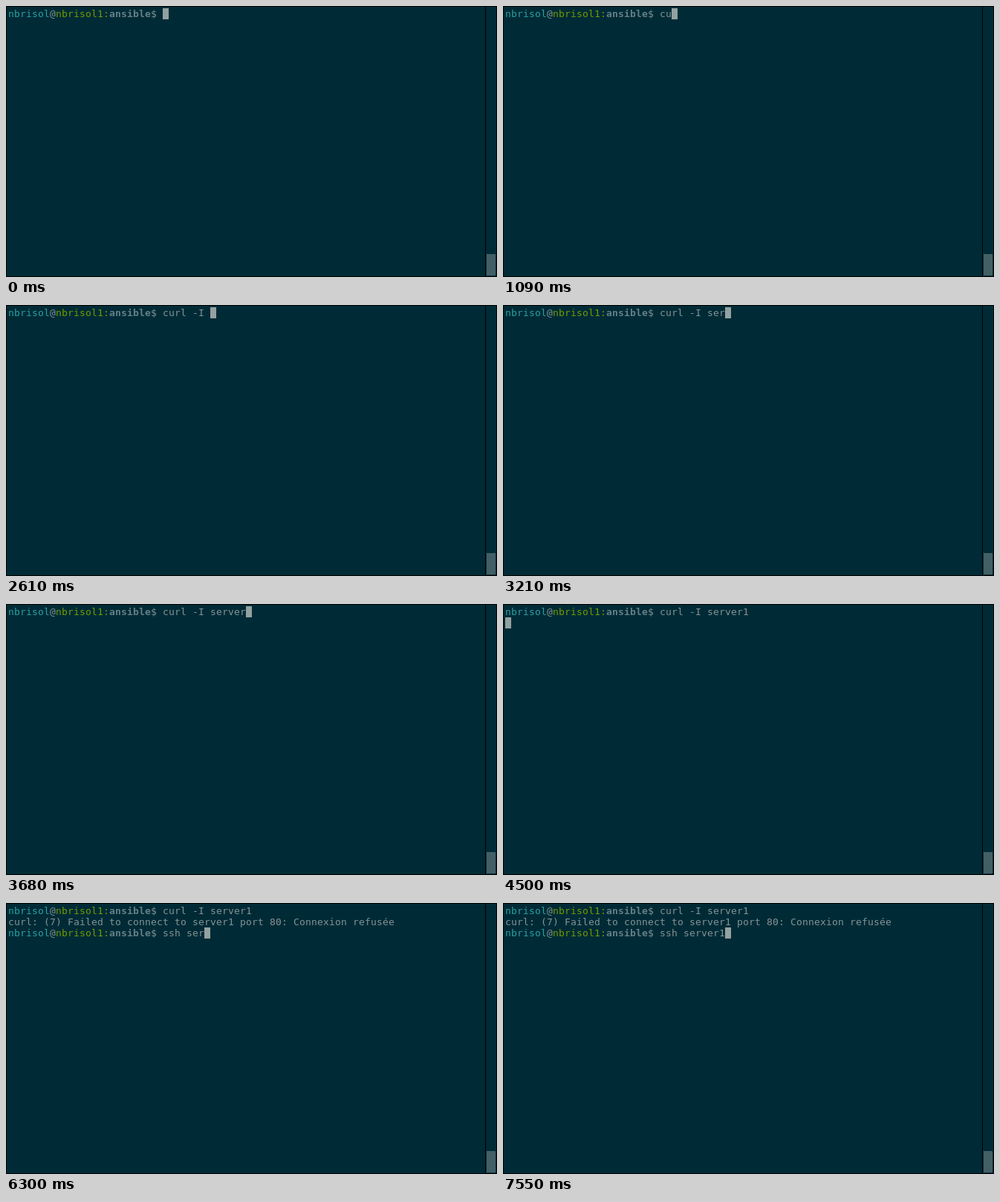
Recreate the animation shown at these times as an HTML page. Size 661 px wide and 366 px high, loop 8000 ms.

```html
<!DOCTYPE html>
<html lang="fr">
<head>
<meta charset="utf-8">
<title>Terminal</title>
<style>
  html, body { margin: 0; width: 100%; height: 100%; overflow: hidden; background: #002b36; }
  svg { display: block; }
  text { font: 13px "DejaVu Sans Mono", monospace; white-space: pre; }
</style>
</head>
<body>
<svg id="stage" width="661" height="366" viewBox="0 0 661 366">
  <defs>
    <pattern id="stipple" width="2" height="2" patternUnits="userSpaceOnUse">
      <path d="M0 0h1v1h1v1h-1v-1h-1z" fill="#839496" shape-rendering="crispEdges"/>
    </pattern>
  </defs>
  <rect width="661" height="366" fill="#002b36"/>
  <path d="M.5 .5h660v365H.5zM645.5 0v366" fill="none" stroke="#000"/>
  <rect x="647" y="335" width="12" height="29" fill="url(#stipple)"/>
  <g id="screen"></g>
  <rect id="cursor" width="8" height="15" fill="#93a1a1"/>
</svg>
<script>
const LOOP = 8000, CELL_W = 8, CELL_H = 15, MARGIN = 3;
const FG = "#839496", CYAN = "#2aa1a4", GREEN = "#729c00", DIM = "#657f88";
const USER = "nbrisol", HOST = "nbrisol1";
const PROMPT_LENGTH = `${USER}@${HOST}:ansible$ `.length;

const screen = document.getElementById("screen");
const cursor = document.getElementById("cursor");

// Each step: time in ms, then the characters that appear.
const curlKeys = [
  [1000, "c"], [1090, "u"], [1230, "r"], [1490, "l"], [1570, " "],
  [2230, "-"], [2510, "I"], [2610, " "], [2930, "s"], [3140, "e"],
  [3210, "r"], [3400, "v"], [3620, "e"], [3680, "r"], [3970, "1"]
];
const sshKeys = [
  [5600, "s"], [5750, "s"], [5850, "h"], [5950, " "], [6100, "s"],
  [6240, "e"], [6300, "r"], [6940, "ver"], [7550, "1"]
];
const ENTER = 4500, REPLY = 4600;

const cellX = col => MARGIN + col * CELL_W;
const cellY = row => MARGIN + row * CELL_H;
const typed = (keys, t) => keys.filter(([at]) => at <= t).map(([, s]) => s).join("");

function addText(row, col, content, fill = FG, weight = "normal") {
  const el = document.createElementNS("http://www.w3.org/2000/svg", "text");
  el.setAttribute("y", cellY(row) + 12);
  el.setAttribute("fill", fill);
  el.setAttribute("font-weight", weight);
  el.style.fontWeight = weight;
  screen.append(el);
  setText(el, col, content);
  return el;
}

function setText(el, col, content) {
  if (el.textContent === content) return;
  el.setAttribute("x", Array.from(content, (_, i) => cellX(col + i)).join(" "));
  el.textContent = content;
}

function addPrompt(row) {
  const parts = [
    [USER, CYAN], ["@"], [HOST + ":", GREEN], ["ansible", DIM, "bold"], ["$"]
  ];
  let col = 0;
  return parts.map(([content, fill, weight]) => {
    const el = addText(row, col, content, fill, weight);
    col += content.length;
    return el;
  });
}

addPrompt(0);
const curlLine = addText(0, PROMPT_LENGTH, "");
const reply = [
  addText(1, 0, "curl: (7) Failed to connect to server1 port 80: Connexion refusée"),
  ...addPrompt(2)
];
const sshLine = addText(2, PROMPT_LENGTH, "");

function cursorCell(t, curl, ssh) {
  if (t < ENTER) return [0, PROMPT_LENGTH + curl.length];
  if (t < REPLY) return [1, 0];
  return [2, PROMPT_LENGTH + ssh.length];
}

function draw(t) {
  const curl = typed(curlKeys, t), ssh = typed(sshKeys, t);
  setText(curlLine, PROMPT_LENGTH, curl);
  setText(sshLine, PROMPT_LENGTH, ssh);
  for (const el of reply) el.setAttribute("visibility", t < REPLY ? "hidden" : "visible");
  const [row, col] = cursorCell(t, curl, ssh);
  cursor.setAttribute("x", cellX(col));
  cursor.setAttribute("y", cellY(row));
}

function tick() {
  draw(performance.now() % LOOP);
  requestAnimationFrame(tick);
}
tick();
</script>
</body>
</html>
```
